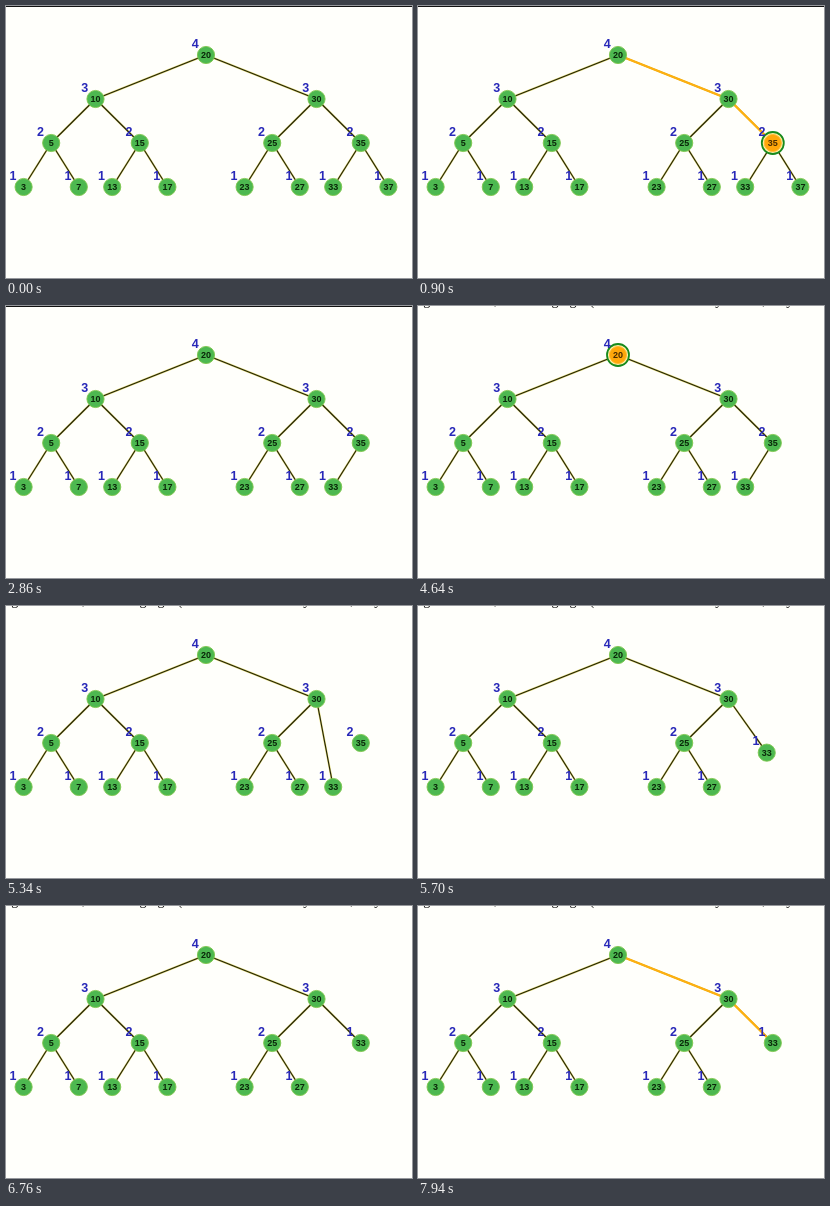
Animation of 406x272 px, one loop 8 s. Source, as an HTML page with a canvas:

```html
<!DOCTYPE html>
<html lang="en">
<head>
<meta charset="utf-8">
<title>Balanced tree deletion</title>
<style>
html, body { margin: 0; width: 100%; height: 100%; overflow: hidden; background: #fffffb; }
canvas { display: block; width: 406px; height: 272px; }
</style>
</head>
<body>
<canvas id="stage"></canvas>
<script>
const W = 406, H = 272, LOOP = 8000;
const DOWN = 165, UP = 75;            // ms per tree level
const FIRST_CUT = 1310, CAPTION_AT = 4640, RELINK = 5300, SECOND_CUT = 5420, RISE = 360;
const SANS = '"Liberation Sans", Arial, sans-serif';
const SERIF = '"Liberation Serif", Times, serif';
const CAPTION = 'eg in children, it is changing a (a sole child and its key moves, they rest';

const canvas = document.getElementById('stage');
const ctx = canvas.getContext('2d');
const dpr = window.devicePixelRatio || 1;
canvas.width = W * dpr;
canvas.height = H * dpr;

const clamp = v => Math.max(0, Math.min(1, v));
const mix = (a, b, p) => a + (b - a) * p;

// Each level has its own horizontal spread and key difference.
const SPREAD = [110.5, 44.3, 27.6], KEY_GAP = [10, 5, 2];

function grow(tree, key, x, level, parent) {
  tree[key] = { key, x, y: 49 + 44 * level, height: 4 - level, parent };
  if (level < 3)
    for (const side of [-1, 1])
      grow(tree, key + side * KEY_GAP[level], x + side * SPREAD[level], level + 1, key);
  return tree;
}

function treeAt(t) {
  const tree = grow({}, 20, 200, 0);
  if (t >= FIRST_CUT) delete tree[37];
  if (t >= RELINK) {
    const moving = tree[33], old = tree[35], p = clamp((t - SECOND_CUT) / RISE);
    moving.parent = 30;
    moving.x = mix(moving.x, old.x, p);
    moving.y = mix(moving.y, old.y, p);
    old.parent = undefined;
    if (t >= SECOND_CUT) delete tree[35];
  }
  return tree;
}

// Search: light a node, then grow the edge to the next one.
function descend(tree, path, start, end, t) {
  if (t < start || t >= end) return;
  path.forEach((key, i) => {
    const node = tree[key], since = t - start - i * DOWN;
    const last = i === path.length - 1;
    node.lit = node.ring = since >= 0 && (last || since < DOWN / 2);
    if (i) node.glow = clamp(1 + since * 2 / DOWN);
  });
}

// Rebalance: the ring climbs to the root, visited nodes stay lit.
function ascend(tree, path, start, rest, end, t) {
  if (t < start || t >= end) return;
  const current = Math.min(path.length - 1, Math.floor((t - start) / UP));
  path.forEach((key, i) => {
    const node = tree[key];
    node.lit = i <= current;
    node.ring = i === current && t < rest;
    node.glow = 1;
  });
}

function line(a, b, p, color, width) {
  ctx.strokeStyle = color;
  ctx.lineWidth = width;
  ctx.beginPath();
  ctx.moveTo(a.x, a.y);
  ctx.lineTo(mix(a.x, b.x, p), mix(a.y, b.y, p));
  ctx.stroke();
}

function disc(n, r, fill, stroke, width) {
  ctx.beginPath();
  ctx.arc(n.x, n.y, r, 0, 2 * Math.PI);
  ctx.fillStyle = fill;
  ctx.strokeStyle = stroke;
  ctx.lineWidth = width;
  ctx.fill();
  ctx.stroke();
}

function text(str, x, y, font, color, align = 'center') {
  ctx.font = font;
  ctx.fillStyle = color;
  ctx.textAlign = align;
  ctx.fillText(str, x, y);
}

function drawEdge(a, b) {
  line(a, b, 1, '#e4dc78', 2);
  line(a, b, 1, '#222206', 1.15);
  if (b.glow) line(a, b, b.glow, '#ffb010', 2.3);
}

function drawNode(n) {
  if (n.ring) disc(n, 11, '#fff0a8', '#178a1c', 1.8);
  disc(n, 8.6, n.lit ? '#ffa70a' : '#4db850', n.lit ? '#ffb830' : '#80c850', 0.9);
  text(n.key, n.x, n.y + 3, `bold 9px ${SANS}`, n.lit ? '#4a2c00' : '#0a280a');
}

function draw(t) {
  const tree = treeAt(t);
  descend(tree, [20, 30, 35, 37], 500, FIRST_CUT, t);
  ascend(tree, [35, 30, 20], FIRST_CUT, 1680, 2860, t);
  descend(tree, [20, 30, 35], CAPTION_AT, 5260, t);
  ascend(tree, [33, 30, 20], SECOND_CUT + RISE, 6150, 6760, t);
  descend(tree, [20, 30, 33], 7610, LOOP, t);
  if (t >= 7610) tree[33].lit = tree[33].ring = false;

  ctx.setTransform(dpr, 0, 0, dpr, 0, 0);
  ctx.fillStyle = '#fffffb';
  ctx.fillRect(0, 0, W, H);

  const nodes = Object.values(tree);
  nodes.forEach(n => n.parent && drawEdge(tree[n.parent], n));
  nodes.forEach(drawNode);
  nodes.forEach(n => text(n.height, n.x - 10.7, n.y - 7.5, `bold 12.5px ${SANS}`, '#2828b8'));

  // The caption sits above the stage: only its descenders show.
  if (t >= CAPTION_AT) text(CAPTION, -1, -1, `14px ${SERIF}`, '#111', 'left');
  else {
    ctx.fillStyle = '#111';
    ctx.fillRect(0, 0, W, 1);
  }
}

const origin = performance.now();
function tick() {
  draw((performance.now() - origin) % LOOP);
  requestAnimationFrame(tick);
}
tick();
</script>
</body>
</html>
```
